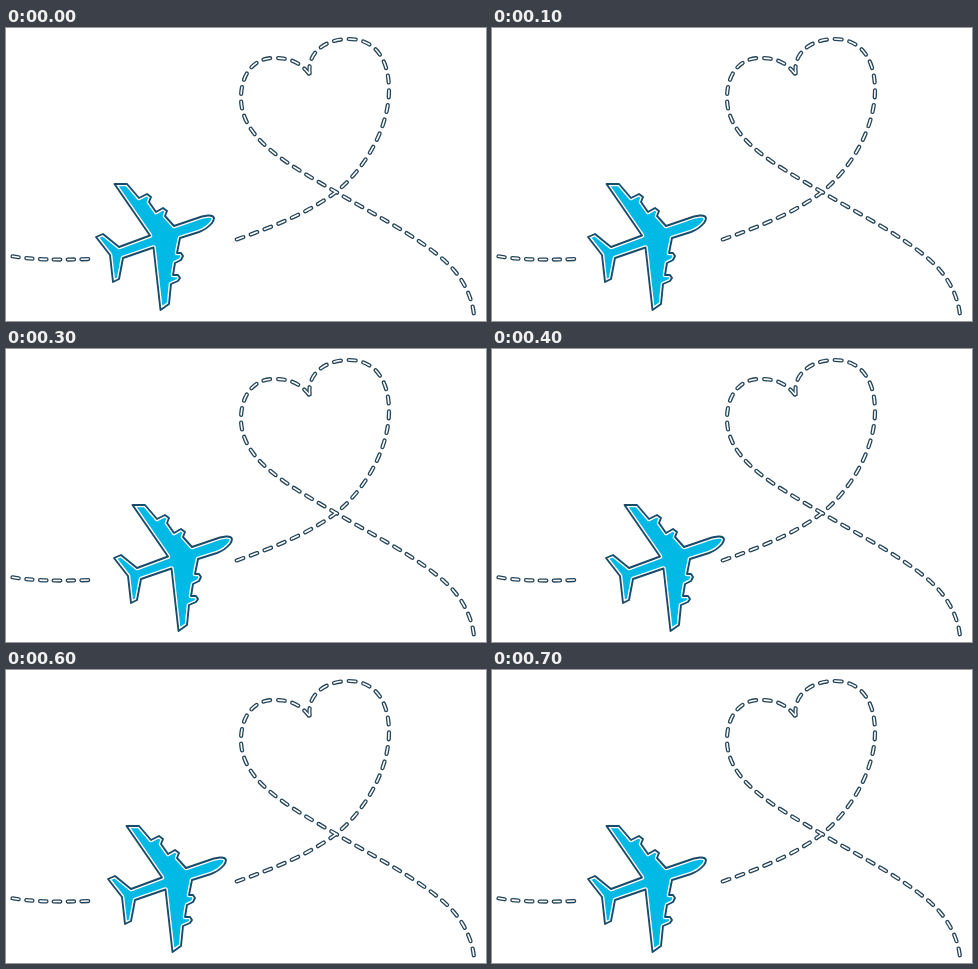
An HTML page that plays this animation: 480 by 293 pixels, repeating every 800 ms.

```html
<!DOCTYPE html>
<html lang="en">
<head>
<meta charset="utf-8">
<title>Plane and heart trail</title>
<style>
  html, body { margin: 0; height: 100%; overflow: hidden; background: #fff; }
  svg { display: block; width: 100vw; height: 100vh; fill: none; stroke-linejoin: round; }
  .edge, .core { stroke-linecap: round; stroke-dasharray: 6.6 7.4; stroke-dashoffset: -1.7; }
  .edge { stroke: #244459; stroke-width: 4.2; }
  .core { stroke: #fff; stroke-width: 1.6; }
  .body { fill: #00b9e4; stroke: #fff; stroke-width: 4.6; }
  .line { stroke: #194b6b; stroke-width: 1.9; }
</style>
</head>
<body>
<svg viewBox="0 0 480 293">
  <defs>
    <!-- pathLength = 14 per dash, less the last gap -->
    <path id="tail" pathLength="80" d="M5 228Q30 233 84 231"/>
    <path id="rise" pathLength="346" d="M229 212C267 199 304 184 330 164C361 139 383 98 383 62C383 30 368 11 343 11C318 11 300 26 304 47"/>
    <path id="fall" pathLength="416" d="M304 47C294 34 284 30 268 30C247 30 235 47 235 70C235 112 284 137 330 164C367 186 411 208 439 233C456 248 466 268 468 287"/>
    <path id="shape" d="M208 190Q207 187 202 187.500Q196 188 190 190.500L168 198L159 188L161 183L157 180L150 184L143 174L145 169L141 166L133 170L121 156L108.500 156L144 207.500L113 219L97 206L90 209L104 227L107 254L113 251L117 230L147.500 219.500L154.500 282L163 276L165 256L172 253L174 250L172 247L167 247L169 235L175 232L177 228L175 225L171 225L174 210L193 204Q201 201 206 195Q208 192 208 190Z"/>
    <g id="trail"><use href="#tail"/><use href="#rise"/><use href="#fall"/></g>
  </defs>
  <use class="edge" href="#trail"/>
  <use class="core" href="#trail"/>
  <g id="plane">
    <use class="body" href="#shape"/>
    <use class="line" href="#shape"/>
  </g>
</svg>
<script>
  const plane = document.getElementById("plane");

  // Six pixels per 100 ms: four steps forward, four back
  function draw(now) {
    const step = Math.floor(now / 100) % 8;
    const x = 6 * (4 - Math.abs(4 - step));
    plane.setAttribute("transform", `translate(${x} 0)`);
    requestAnimationFrame(draw);
  }
  draw(performance.now());
</script>
</body>
</html>
```
